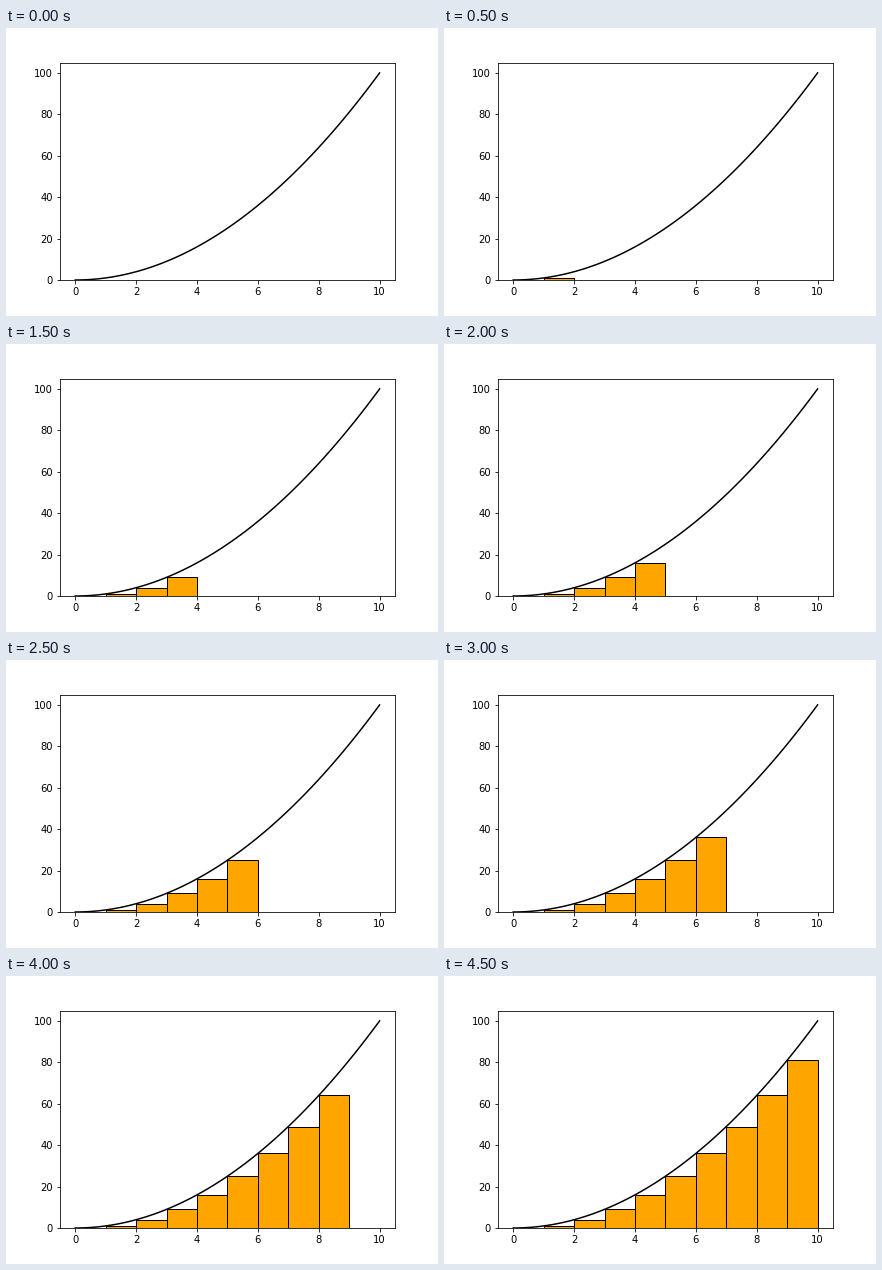
Write a matplotlib script that moves like this. It is 432x288 px and loops after 5000 ms.

```python
import numpy as np
import matplotlib.pyplot as plt
from matplotlib.animation import FuncAnimation

STEPS = 10


def f(x):
    return x ** 2


fig, ax = plt.subplots(figsize=(6, 4), dpi=72)
fig.subplots_adjust(left=0.125, right=0.9, bottom=0.125, top=0.88)

curve_x = np.linspace(0, 10, 100)
ax.plot(curve_x, f(curve_x), color="black")

left = np.arange(STEPS)
bars = ax.bar(left, f(left), width=1, align="edge",
              color="orange", edgecolor="black")

ax.set_xlim(-0.5, 10.5)
ax.set_ylim(0, 105)


def update(step):
    for i, bar in enumerate(bars):
        bar.set_visible(i <= step)
    return list(bars)


anim = FuncAnimation(fig, update, frames=STEPS, interval=500,
                     repeat=True, repeat_delay=0, blit=False)
plt.show()
```
